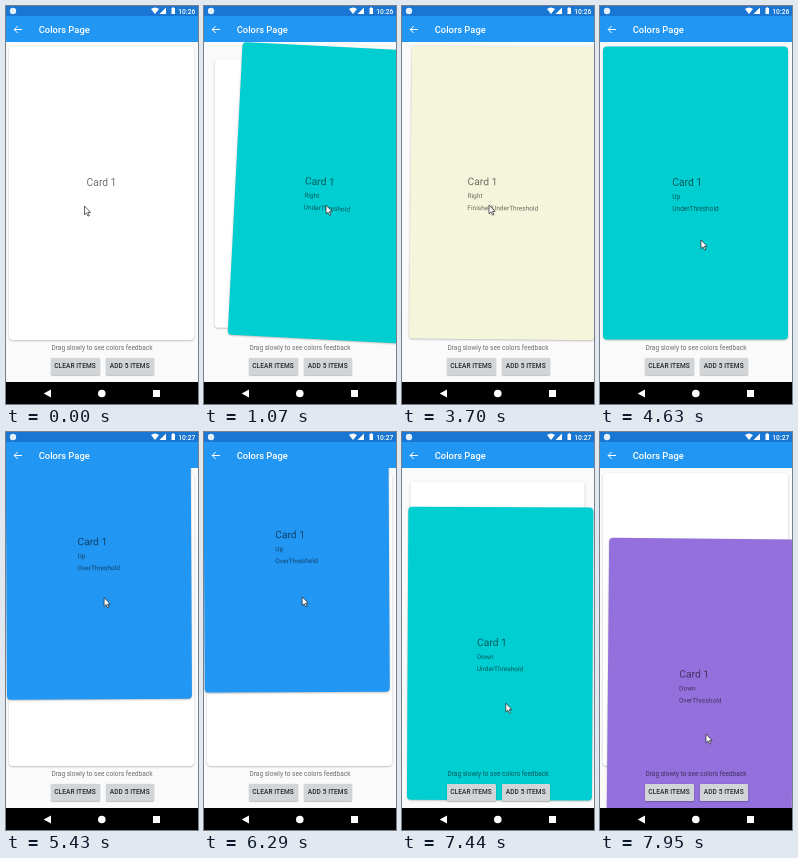
An HTML page that plays this animation: 192x398 px, repeating every 8 s.

```html
<!DOCTYPE html>
<html lang="en">
<head>
<meta charset="utf-8">
<title>Colors Page</title>
<style>
  html, body { margin: 0; width: 100%; height: 100%; overflow: hidden; }
  body { position: relative; background: #fafafa; font: 6.55px Roboto, sans-serif; color: rgba(0,0,0,.56); }
  svg { position: absolute; left: 0; top: 0; overflow: visible; }
  #page { position: absolute; left: 0; top: 36px; width: 192px; height: 340px; overflow: hidden; }
  .card { position: absolute; left: 3px; top: 5px; width: 185px; height: 293px; border-radius: 4px;
    background: #fff; box-shadow: 0 .8px 2px rgba(0,0,0,.28); }
  .labels { position: absolute; left: 50%; top: 128px; transform: translateX(-50%);
    white-space: nowrap; line-height: 12px; }
  .labels b { display: block; font-weight: 400; font-size: 10.27px; line-height: 15.5px; }
  .labels span { display: block; }
  #hint { position: absolute; top: 300px; width: 192px; line-height: 12px; text-align: center; }
  .button { position: absolute; top: 316px; height: 17px; border-radius: 1px; background: #d2d5d7;
    box-shadow: 0 .6px 1.2px rgba(0,0,0,.4); color: #1f262b; font-weight: 500; line-height: 17px;
    text-align: center; white-space: nowrap; letter-spacing: .08px; }
</style>
</head>
<body>
<div id="page">
  <div class="card" id="back"></div>
  <div class="card" id="front">
    <div class="labels"><b>Card 1</b><span id="direction"></span><span id="state"></span></div>
  </div>
  <div id="hint">Drag slowly to see colors feedback</div>
  <div class="button" style="left:44.5px;width:49px">CLEAR ITEMS</div>
  <div class="button" style="left:100px;width:47.5px">ADD 5 ITEMS</div>
</div>

<svg width="192" height="398" font-family="Roboto, sans-serif" fill="#fff">
  <rect width="192" height="36" fill="#2196f3"/>
  <rect width="192" height="10" fill="#1976d2"/>
  <circle cx="7" cy="5" r="3.2" fill="#e3effa"/>
  <path d="M145 3q4-3 8 0l-4 5zM160 1.5v6.5h-6.5zM165.5 2h1v-.7h1.5v.7h1v6h-3.5z"/>
  <text id="clock" x="172.3" y="7.5" font-size="6.7" font-weight="500"></text>
  <path d="M16 23.5H8M11.7 20l-3.5 3.5 3.5 3.5" fill="none" stroke="#fff"/>
  <text x="32.7" y="27" font-size="9.4" font-weight="500">Colors Page</text>
  <rect y="376" width="192" height="22" fill="#000"/>
  <path d="M45 383.5v8l-7.3-4zM147 384h7v7h-7z"/>
  <circle cx="95.8" cy="387.5" r="3.8"/>
  <path id="cursor" d="M0 0v8.8l2-1.9 1.5 3.2 1.4-.6-1.5-3.1h2.7z" stroke="#222" stroke-width=".7"/>
</svg>

<script>
const LOOP = 8000, THRESHOLD = 48, DEGREES_PER_PX = 20 / 192;
const MINUTE_CHANGE = 5000, SPRING_TIME = 250;
const OVER_COLORS = { Left: '#ff6a4f', Right: '#63dd99', Up: '#2196f3', Down: '#9370db' };

const easeIn = p => p * p;
const smooth = p => p * p * (3 - 2 * p);
const springOut = p => (p - 1) ** 2 * (2.7 * (p - 1) + 1.7) + 1;
const progress = (t, start, length) => Math.min(1, Math.max(0, (t - start) / length));

// Mouse strokes: each leads from the previous position to x, y
const home = { x: 78.5, y: 200 };
const strokes = [
  { start: 460, length: 690, x: 134, y: 199, ease: easeIn },
  { start: 1150, length: 540, x: 141, y: 199 },
  { start: 2310, length: 10, x: 132.5, y: 199 },
  { start: 2680, length: 120, x: 87, y: 199 },
  { start: 4130, length: 420, x: 101, y: 235 },
  { start: 4550, length: 1200, x: 97.5, y: 151 },
  { start: 6100, length: 780, x: 102, y: 243 },
  { start: 6930, length: 790, x: 104.5, y: 282.5 },
  { start: 7770, length: 180, x: 106, y: 302 }
];

// The card trails the mouse by `lag` ms while it is held
const swipe = { press: 460, lag: 120, release: 3680 };
const lift = { press: 4550, lag: 30, release: LOOP };

function mouseAt(t) {
  let { x, y } = home;
  for (const s of strokes) {
    const p = (s.ease || smooth)(progress(t, s.start, s.length));
    x += (s.x - x) * p;
    y += (s.y - y) * p;
  }
  return { x, y };
}

function cardAt(t) {
  const drag = t < lift.press ? swipe : lift;
  const held = Math.max(drag.press, Math.min(t, drag.release) - drag.lag);
  const grab = mouseAt(drag.press), mouse = mouseAt(held);
  const rest = 1 - springOut(progress(t, drag.release, SPRING_TIME));
  return { x: (mouse.x - grab.x) * rest, y: (mouse.y - grab.y) * rest };
}

function describe(t, x, y, reach) {
  if (t <= swipe.press + swipe.lag) return ['', '', '#fff'];
  if (t >= swipe.release && t <= lift.press + lift.lag) return ['Right', 'FinishedUnderThreshold', '#f5f5dc'];
  const horizontal = Math.abs(x) > Math.abs(y);
  const direction = horizontal ? (x < 0 ? 'Left' : 'Right') : (y < 0 ? 'Up' : 'Down');
  return reach < 1
    ? [direction, 'UnderThreshold', '#00ced1']
    : [direction, 'OverThreshold', OVER_COLORS[direction]];
}

const byId = id => document.getElementById(id);

function draw(t) {
  const { x, y } = cardAt(t), mouse = mouseAt(t);
  const reach = Math.min(1, Math.max(Math.abs(x), Math.abs(y)) / THRESHOLD);
  const [direction, state, color] = describe(t, x, y, reach);
  byId('back').style.transform = `scale(${0.8 + 0.2 * reach})`;
  byId('front').style.transform = `translate(${x}px, ${y}px) rotate(${x * DEGREES_PER_PX}deg)`;
  byId('front').style.background = color;
  byId('direction').textContent = direction;
  byId('state').textContent = state;
  byId('clock').textContent = t < MINUTE_CHANGE ? '10:26' : '10:27';
  byId('cursor').setAttribute('transform', `translate(${mouse.x} ${mouse.y})`);
}

const start = performance.now();
function tick() {
  draw((performance.now() - start) % LOOP);
  requestAnimationFrame(tick);
}
tick();
</script>
</body>
</html>
```
